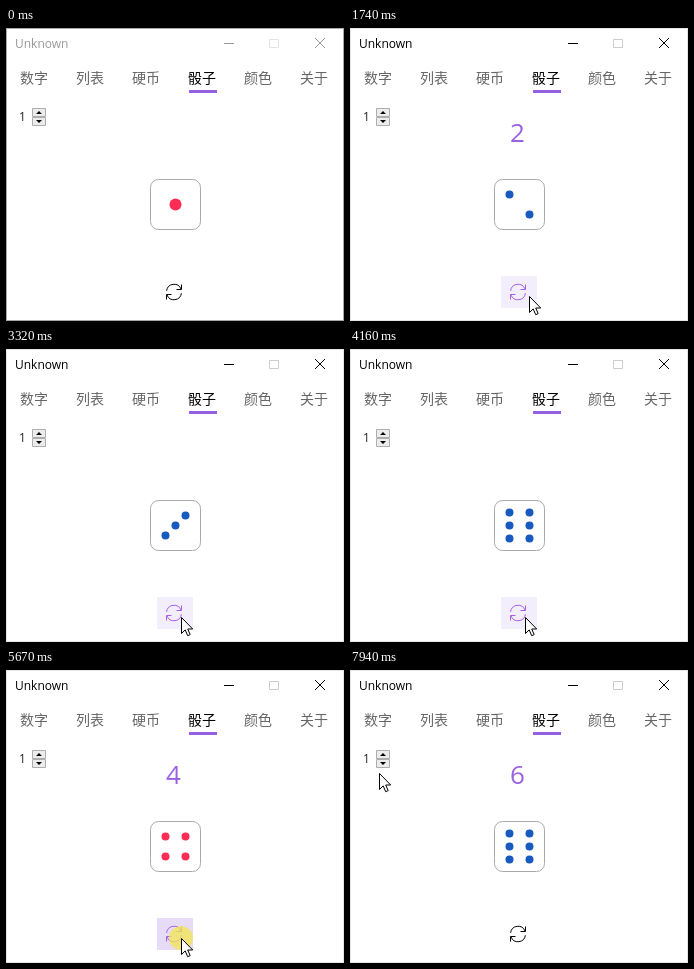
Recreate the animation shown at these times as an HTML page. Size 338 by 293 pixels, loop 7990 ms.

```html
<!DOCTYPE html>
<html lang="zh">
<head>
<meta charset="utf-8">
<title>Dice</title>
<style>
  html, body { margin: 0; width: 100%; height: 100%; overflow: hidden; background: #fff; }
  svg { display: block; }
  text { font-family: "Open Sans", "Noto Sans", sans-serif; }
  #tabs text { font: 14px "Noto Sans CJK SC", "Noto Sans CJK", sans-serif; fill: #666; }
  #tabs .active { fill: #000; }
</style>
</head>
<body>
<svg width="338" height="293" viewBox="0 0 338 293" fill="none">
  <rect id="frame" x=".5" y=".5" width="337" height="292"/>
  <text id="title" x="9" y="20" font-size="12">Unknown</text>
  <g id="controls">
    <path d="M218 15.5h10M309 10l10 10M319 10l-10 10"/>
    <path id="maximize" d="M263.5 11.5h9v8h-9z"/>
  </g>
  <g id="tabs"></g>
  <path d="M183 62h28v3h-28z" fill="#9460e0"/>

  <text x="13" y="93" font-size="12" fill="#222">1</text>
  <path d="M26.5 80.5h13v8h-13zM26.5 89.5h13v8h-13z" fill="#ececec" stroke="#adadad"/>
  <path d="M30 86h6l-3-3zM30 92h6l-3 3z" fill="#000"/>

  <text id="result" x="167.5" y="114" font-size="26" text-anchor="middle" fill="#9a62e0"></text>
  <rect x="144.5" y="151.5" width="50" height="50" rx="8" fill="#fff" stroke="#aaa"/>
  <g id="pips"></g>

  <rect id="button" x="151" y="248" width="36" height="32"/>
  <g id="icon">
    <path id="arrow" d="M160.6 262.8A7.5 7.5 0 0 1 175 261M175.5 256.5v5h-5"/>
    <use href="#arrow" transform="rotate(180 168 264)"/>
  </g>
  <circle id="click" r="12" fill="#f3e650" fill-opacity=".75"/>
  <path id="cursor" d="M.5.5v16l3.7-3.6 2.5 5.8 2.5-1.1-2.5-5.6h5z" fill="#fff" stroke="#000"/>
</svg>
<script>
const $ = id => document.getElementById(id);
const LOOP = 7990, PRESS = 100, FACE_TIME = 43;

// start, duration, faces shown while rolling; the last face is the result
const rolls = [
  [370, 370, "52643"],
  [1430, 310, "41652"],
  [2300, 380, "36415"],
  [3090, 360, "24631"],
  [3910, 380, "53162"],
  [4800, 360, "16354"],
  [5670, 380, "25613"],
  [6840, 360, "41526"]
];

// time, x, y of the pointer tip
const pointer = [
  [130, 250, 290], [340, 176, 268], [770, 176, 268], [920, 195, 264], [950, 199, 265],
  [1100, 199, 265], [1280, 179, 268], [2020, 179, 268], [2120, 175, 268],
  [7680, 175, 268], [7940, 29, 103]
];

// pip offsets from the centre of the die
const corners = [[-10, -10], [10, 10], [10, -10], [-10, 10]];
const faces = {
  1: [[0, 0]],
  2: corners.slice(0, 2),
  3: [[10, -10], [0, 0], [-10, 10]],
  4: corners,
  5: [...corners, [0, 0]],
  6: [-13, 0, 13].flatMap(y => [[-10, y], [10, y]])
};

$("tabs").innerHTML = ["数字", "列表", "硬币", "骰子", "颜色", "关于"].map((name, i) =>
  `<text x="${14 + 56 * i}" y="55"${i === 3 ? ' class="active"' : ""}>${name}</text>`).join("");

function pointerAt(t) {
  const i = pointer.findIndex(p => p[0] > t);
  if (i < 0) return pointer.at(-1).slice(1);
  const [t0, x0, y0] = pointer[Math.max(i - 1, 0)], [t1, x1, y1] = pointer[i];
  const k = t1 > t0 ? Math.max(0, (t - t0) / (t1 - t0)) : 0;
  const ease = k * k * (3 - 2 * k);
  return [x0 + (x1 - x0) * ease, y0 + (y1 - y0) * ease].map(Math.round);
}

function diceAt(t) {
  let face = 1, label = "", pressed = false;
  for (const [start, duration, sequence] of rolls) {
    const age = t - start;
    if (age < 0) break;
    pressed = age < PRESS;
    if (pressed) continue;
    face = sequence[Math.min(Math.floor((age - PRESS) / FACE_TIME), sequence.length - 1)];
    label = age < duration ? "" : face;
  }
  return { face, label, pressed };
}

let shownFace;
function drawFace(face) {
  if (face === shownFace) return;
  shownFace = face;
  const color = face == 1 || face == 4 ? "#fd2d55" : "#185abd";
  $("pips").innerHTML = faces[face].map(([x, y]) =>
    `<circle cx="${169.5 + x}" cy="${176.5 + y}" r="${face == 1 ? 6 : 4}" fill="${color}"/>`).join("");
}

function set(id, attributes) {
  for (const name in attributes) $(id).setAttribute(name, attributes[name]);
}

function draw(t) {
  const focused = t >= rolls[0][0], [x, y] = pointerAt(t);
  const { face, label, pressed } = diceAt(t);
  const hover = t >= pointer[0][0] && x >= 151 && x < 187 && y >= 248 && y < 280;

  set("frame", { stroke: focused ? "#e4e4e4" : "#aaa" });
  set("title", { fill: focused ? "#000" : "#999" });
  set("controls", { stroke: focused ? "#000" : "#999" });
  set("maximize", { stroke: focused ? "#ccc" : "#e4e4e4" });
  drawFace(face);
  $("result").textContent = label;
  set("button", { fill: pressed ? "#e6dcf8" : hover ? "#f3eefc" : "none" });
  set("icon", { stroke: hover ? "#a55fe0" : "#000" });
  set("click", { cx: x, cy: y, visibility: pressed ? "visible" : "hidden" });
  set("cursor", {
    transform: `translate(${x} ${y})`,
    visibility: t >= pointer[0][0] ? "visible" : "hidden"
  });
}

let began;
function tick(now) {
  began ??= now;
  draw((now - began) % LOOP);
  requestAnimationFrame(tick);
}
draw(0);
requestAnimationFrame(tick);
</script>
</body>
</html>
```
